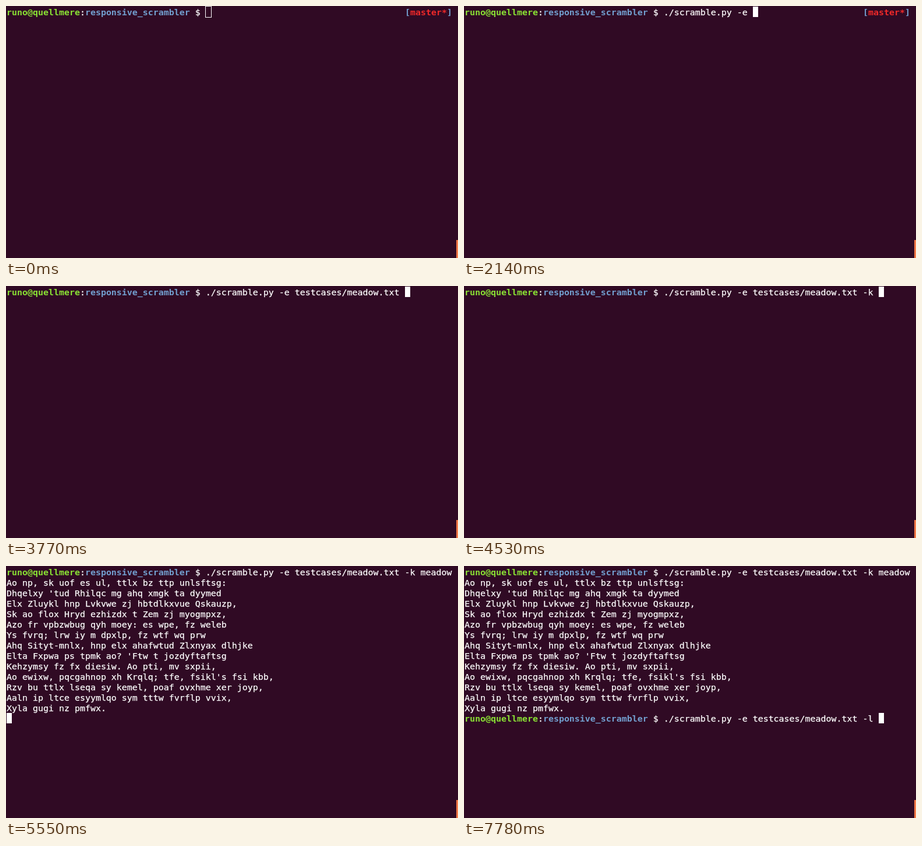
Recreate the animation shown at these times as an HTML page. Size 776 by 434 pixels, loop 8000 ms.

```html
<!DOCTYPE html>
<html lang="en">
<head>
<meta charset="utf-8">
<title>Terminal session</title>
<style>
  html, body { margin: 0; width: 100%; height: 100%; overflow: hidden; background: #300a24; }
  #stage {
    position: relative; width: 776px; height: 434px; overflow: hidden;
    background: #300a24; color: #fff;
    /* this size gives a 9px advance, so the text sits on the 9 x 18 cell grid */
    font: 14.95px/18px "DejaVu Sans Mono", monospace;
    font-variant-ligatures: none;
    -webkit-text-stroke: .25px;
  }
  .row, #output { position: absolute; left: 1px; margin: 0; white-space: pre; font: inherit; }
  .row { width: 774px; height: 18px; }
  .right { position: absolute; left: 684px; top: 0; }
  b { font-weight: bold; -webkit-text-stroke: 0; }
  .user { color: #8ae234; }
  .path { color: #729fcf; }
  .branch { color: #ef2929; }
  #first { top: 2px; }
  #output { top: 20px; }
  #second { top: 254px; }
  #cursor { position: absolute; width: 9px; height: 18px; background: #fff; }
  #cursor.hollow {
    width: 11px; height: 20px; margin: -1px; box-sizing: border-box;
    background: none; border: 1px solid #fff;
  }
  #thumb { position: absolute; left: 773px; top: 403px; width: 3px; height: 31px; background: #f07746; }
</style>
</head>
<body>
<div id="stage">
  <div class="row" id="first"></div>
  <pre id="output">Ao np, sk uof es ul, ttlx bz ttp unlsftsg:
Dhqelxy 'tud Rhilqc mg ahq xmgk ta dyymed
Elx Zluykl hnp Lvkvwe zj hbtdlkxvue Qskauzp,
Sk ao flox Hryd ezhizdx t Zem zj myogmpxz,
Azo fr vpbzwbug qyh moey: es wpe, fz weleb
Ys fvrq; lrw iy m dpxlp, fz wtf wq prw
Ahq Sityt-mnlx, hnp elx ahafwtud Zlxnyax dlhjke
Elta Fxpwa ps tpmk ao? 'Ftw t jozdyftaftsg
Kehzymsy fz fx diesiw. Ao pti, mv sxpii,
Ao ewixw, pqcgahnop xh Krqlq; tfe, fsikl's fsi kbb,
Rzv bu ttlx lseqa sy kemel, poaf ovxhme xer joyp,
Aaln ip ltce esyymlqo sym tttw fvrflp vvix,
Xyla gugi nz pmfwx.</pre>
  <div class="row" id="second"></div>
  <div id="cursor"></div>
  <div id="thumb"></div>
</div>
<script>
const LOOP = 8000, CELL = 9, LINE = 18, PROMPT_COLS = 38, RIGHT_COL = 76;
const ENTER = 5510, PRINTED = 5550, PROMPT_BACK = 5590, BLINK = 6100, RECALL = 6680;
const byId = id => document.getElementById(id);
const cursor = byId('cursor'), output = byId('output');

const SCRIPT = './scramble.py ';
const ENCODE = SCRIPT + '-e ';
const FOLDER = ENCODE + 'testcases/';
const FILE = FOLDER + 'meadow.txt ';
const FULL = FILE + '-k meadow';

// Evenly spaced edits: each item is the whole command after that key press.
const edits = (from, to, texts) => texts.map((text, i) =>
  [from + (to - from) * i / Math.max(1, texts.length - 1), text]);
const typed = (base, keys) => [...keys].map((_, i) => base + keys.slice(0, i + 1));

const firstEdits = [
  [0, ''],
  ...edits(700, 1170, [...typed('', './scram'), SCRIPT]),
  ...edits(1730, 1810, [SCRIPT.trim(), SCRIPT, SCRIPT + '-']),
  ...edits(2080, 2140, [SCRIPT + '-e', ENCODE]),
  ...edits(2590, 2870, [...typed(ENCODE, 'test'), FOLDER]),
  ...edits(3440, 3770, [...typed(FOLDER, 'mead'), FILE]),
  ...edits(4310, 4530, typed(FILE, '-k ')),
  ...edits(4740, 5150, typed(FILE + '-k ', 'meadow'))
];
const secondEdits = [
  [0, ''],
  [RECALL, FULL],
  ...edits(6960, 7160, [2, 3, 5, 7, 8].map(n => FULL.slice(0, -n))),
  ...edits(7700, 7780, [FILE + '-l', FILE + '-l '])
];

function makeRow(id) {
  const row = byId(id);
  row.innerHTML = '<b class="user">runo@quellmere</b>:<b class="path">responsive_scrambler</b> $ ' +
    '<span class="command"></span><b class="suffix">/</b>' +
    '<span class="right"><b class="path">[</b><b class="branch">master*</b><b class="path">]</b></span>';
  const [command, suffix, right] = ['.command', '.suffix', '.right'].map(s => row.querySelector(s));
  return {
    row,
    show(text) {
      // a freshly completed folder keeps its slash bold until the next key
      const completed = text === FOLDER;
      command.textContent = completed ? text.slice(0, -1) : text;
      suffix.hidden = !completed;
      right.hidden = PROMPT_COLS + text.length >= RIGHT_COL;
    }
  };
}
const first = makeRow('first'), second = makeRow('second');

// The small tolerance absorbs the 10 ms rounding of the key times.
const textAt = (list, t) => list.filter(([time]) => time <= t + 5).pop()[1];

function placeCursor(col, line) {
  cursor.style.left = 1 + col * CELL + 'px';
  cursor.style.top = 1 + line * LINE + 'px';
}

function render(t) {
  const firstText = textAt(firstEdits, t), secondText = textAt(secondEdits, t);
  first.show(firstText);
  second.show(secondText);
  output.hidden = t < PRINTED;
  second.row.hidden = t < PROMPT_BACK;

  if (t < ENTER) placeCursor(PROMPT_COLS + firstText.length, 0);
  else if (t < PRINTED) placeCursor(0, 1);
  else if (t < PROMPT_BACK) placeCursor(0, 14);
  else placeCursor(PROMPT_COLS + secondText.length, 14);
  cursor.hidden = t >= BLINK && t < RECALL;
  cursor.className = t < 40 ? 'hollow' : '';
}

const start = performance.now();
function tick() {
  render((performance.now() - start) % LOOP);
  requestAnimationFrame(tick);
}
tick();
</script>
</body>
</html>
```
